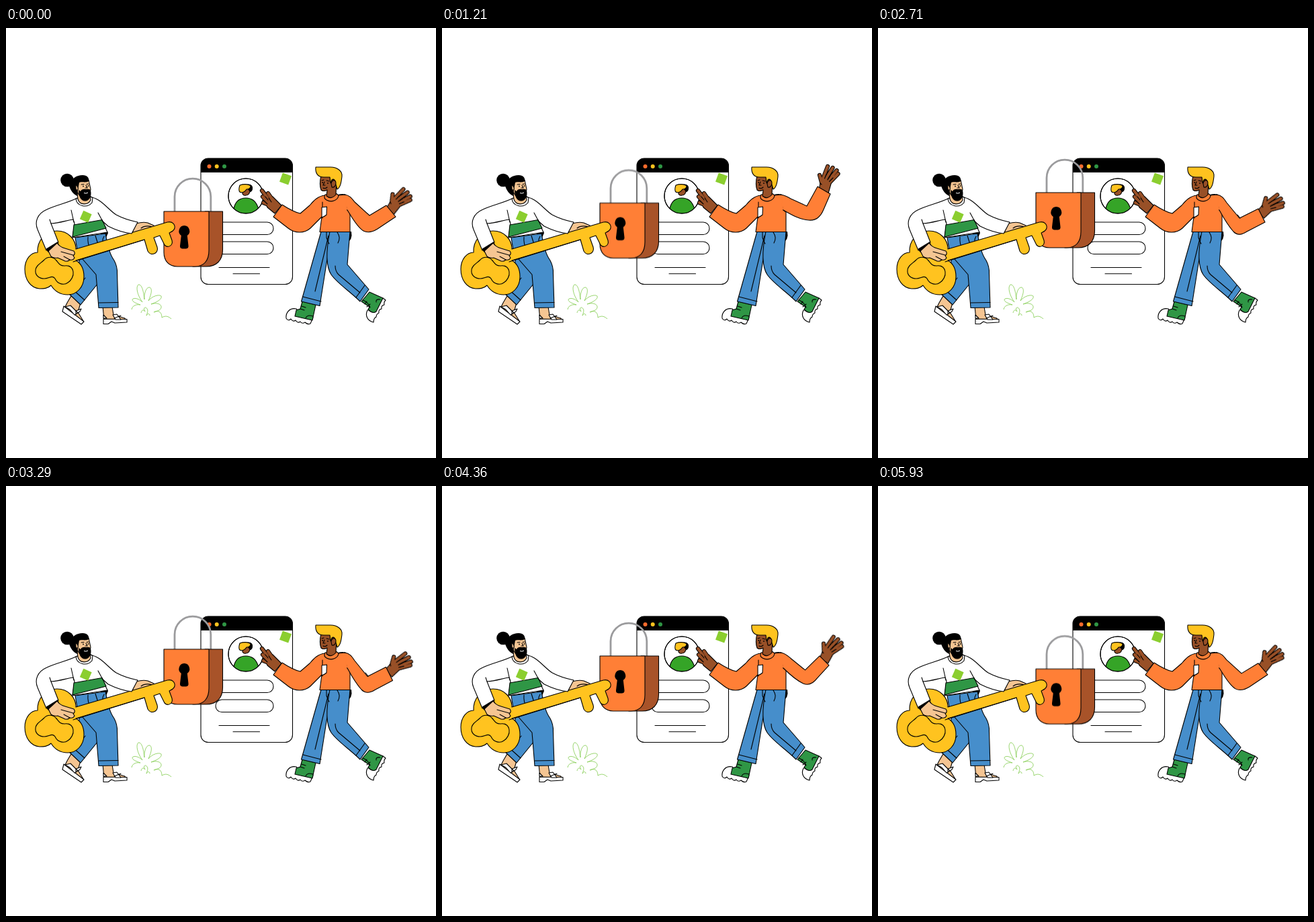
These frames come from a looping animation (640x640 px, 6000 ms). An HTML page:

```html
<!DOCTYPE html>
<html lang="en">
<head>
<meta charset="utf-8">
<title>Unlocking a profile</title>
<style>
html, body { margin: 0; width: 100%; height: 100%; overflow: hidden; background: #fff; }
svg { display: block; width: 100vw; height: 100vh; }

.ink { stroke: #000; stroke-width: 1.1; stroke-linejoin: round; stroke-linecap: round; }
.none { fill: none; }
.white { fill: #fff; }
.black { fill: #000; }
.orange { fill: #ff7f36; }
.rust { fill: #a85329; }
.yellow { fill: #ffc31f; }
.blue { fill: #468ecb; }
.green { fill: #2f9645; }
.lime { fill: #8bce2f; }
.skin { fill: #f5c592; }
.brown { fill: #985027; }
.finger-edge { fill: none; stroke: #000; stroke-width: 6.2; stroke-linecap: round; }
.finger { fill: none; stroke: #985027; stroke-width: 4.2; stroke-linecap: round; }

#lock { animation: lift 6s infinite; }
#arm { animation: arm 6s ease-in-out infinite; }
#hand { animation: hand 6s ease-in-out infinite; }
#crease { animation: crease 6s step-end infinite; }

@keyframes lift {
  0% { transform: translateY(0); animation-timing-function: linear; }
  50% { transform: translateY(-31px); animation-timing-function: cubic-bezier(.25, 0, .75, .75); }
  100% { transform: translateY(0); }
}
@keyframes arm {
  0%, 100% { d: path("M504 248 C512 249 515 254 519 259 L541 279 L566 264 L580 281 L553 299 C545 304 538 305 532 302 C522 296 514 280 508 271"); }
  20%, 31% { d: path("M504 248 C510 249 514 251 519 254 L543 265 L559 236 L578 247 L568 270 C564 280 557 287 546 286 C532 285 520 278 508 271"); }
  25.5%, 81% { d: path("M504 248 C510 249 514 251 519 253 L543 264 L559 236 L577 244 L568 268 C564 279 557 286 546 285 C532 284 520 278 508 271"); }
  45% { d: path("M504 248 C512 249 515 254 519 260 L538 283 L566 269 L576 289 L549 303 C541 308 535 309 529 303 C520 293 514 282 508 271"); }
  64.3% { d: path("M504 248 C512 249 515 254 519 260 L538 284 L565 270 L575 290 L549 304 C541 309 535 309 529 303 C520 293 514 282 508 271"); }
}
@keyframes hand {
  0%, 100% { transform: translate(572px, 272px) rotate(22deg); }
  20%, 31% { transform: translate(568px, 243px) rotate(0deg); }
  25.5%, 81% { transform: translate(567px, 240px) rotate(-5deg); }
  45% { transform: translate(570px, 277px) rotate(31deg); }
  64.3% { transform: translate(570px, 279px) rotate(31deg); }
}
@keyframes crease {
  0%, 100% { opacity: 0; }
  43% { opacity: 1; }
  66% { opacity: 0; }
}
</style>
</head>
<body>
<svg viewBox="0 0 640 640">
  <defs>
    <clipPath id="disc"><circle cx="357" cy="250" r="26"/></clipPath>
    <clipPath id="pane"><rect x="290" y="194" width="136.5" height="187.5" rx="11"/></clipPath>
    <path id="fingers" d="M-1 -19L6 -37M3 -18L13.500 -35M7 -16L19.500 -31M8 -12L21.500 -26M-3 -13L-6 -24"/>
    <path id="resting" d="M394 259L381 242M390 260L382 251M391 263L383 260M399 259L390 246"/>
  </defs>

  <!-- Profile window -->
  <rect class="white" x="290" y="194" width="136.5" height="187.5" rx="11"/>
  <rect x="290" y="194" width="137" height="21" clip-path="url(#pane)"/>
  <rect class="ink none" x="290" y="194" width="136.5" height="187.5" rx="11"/>
  <circle fill="#ff6c2c" cx="302.5" cy="206" r="3"/>
  <circle class="yellow" cx="313.7" cy="206" r="3"/>
  <circle class="green" cx="325" cy="206" r="3"/>
  <rect class="lime" x="409" y="217.5" width="14" height="14" transform="rotate(20 416 224.5)"/>
  <circle class="ink white" cx="357" cy="250" r="26"/>
  <g clip-path="url(#disc)">
    <path class="ink" fill="#35a427" d="M338 276C339 260 346 253 357 253S375 260 377 276Z"/>
  </g>
  <path class="black" d="M358 233C364 231 368 235 367 239C367 243 364 245 361 244Z"/>
  <path class="ink brown" d="M352 241L352 247Q354 250 357 249Q362 249 363 243L360 239Z"/>
  <path class="ink yellow" d="M348 234C353 232 361 232 364 235C364 239 361 240 358 240C356 244 351 246 348 244C346 242 347 237 348 234Z"/>
  <circle class="ink none" cx="357" cy="250" r="26"/>
  <rect class="ink white" x="312" y="289" width="86" height="18.5" rx="9.2"/>
  <rect class="ink white" x="312" y="318" width="86" height="18.5" rx="9.2"/>
  <path class="ink none" d="M317 356.5H392M338 365.800H377.5"/>

  <!-- Padlock -->
  <g id="lock">
    <path fill="none" stroke="#9b9b9d" stroke-width="2.8" d="M251 273V251A26.9 26.9 0 0 1 304.8 251V273"/>
    <path class="ink rust" d="M296 273H322.5V330C322.5 346 313 355 298 355H278Z"/>
    <path class="ink orange" d="M235 273H302V331C302 347 294 355 281 355H255C243 355 235 347 235 334Z"/>
    <path class="black" d="M265.3 294A8.3 8.3 0 0 1 269.8 309L271.5 324Q272 328 268 328.5H262.5Q258.5 328 259 324L260.8 309A8.3 8.3 0 0 1 265.3 294Z"/>
  </g>

  <!-- Waving man -->
  <g>
    <!-- boots -->
    <path class="ink white" d="M432 418C422 416 416 424 417 432Q420 437 424 433Q427 438 431 435Q434 440 438 437Q441 441 445 438Q449 442 453 440L457 431L438 424Z"/>
    <path class="ink green" d="M441 407L461 412L456 435L430 429L432 420L438 418Z"/>
    <path class="ink none" d="M438 418L444 420M440 414L446 416M446 432Q448 426 457 429"/>
    <path class="ink white" d="M561 402L565 405Q562 408 563 412Q558 413 559 418Q554 419 555 424Q551 426 551 430Q547 432 547 438C538 436 534 428 538 420L549 418Z"/>
    <path class="ink green" d="M541 393L561 402L551 422Q546 426 539 419L541 415L529 407Z"/>
    <path class="ink none" d="M531 405Q539 408 542 416M537 407L534 411M542 411L537 415M551 408Q550 403 557 404"/>
    <!-- jeans -->
    <path class="black" d="M509 303H514L514.5 309Q514 314 511 317L507 312Z"/>
    <path class="ink blue" d="M469 303L439.500 407L467 413.500L481 325L496 304Z"/>
    <path class="ink blue" d="M482 303C477 328 475 353 484 367C493 380 512 392 527 407L540 389L508 352L512 303Z"/>
    <path class="ink none" d="M442 400L469 407M521 401L534 383M480 309L460 392M477 304V312Q480 320 481 321M493 304C497 310 497 314 494 320M490 354Q490 362 495 367L527 394"/>
    <!-- resting hand -->
    <use href="#resting" class="finger-edge"/>
    <path class="ink brown" d="M397 251L410 264L400 276L389 267L385 258L390 256Z"/>
    <use href="#resting" class="finger"/>
    <path class="ink none" d="M390 256L386 251M389 262L384 257M395 259L391 253"/>
    <!-- raised hand -->
    <g id="hand">
      <use href="#fingers" class="finger-edge"/>
      <path class="ink brown" d="M-7 -1L-5 -13L-1 -20L9 -17L11 -11L7 3Z"/>
      <use href="#fingers" class="finger"/>
      <path class="ink none" d="M1.500 -19L4 -25M6 -17L10 -23M8.500 -14.500L14 -20M-5 -12L-3 -10"/>
    </g>
    <!-- jumper -->
    <path class="ink orange" d="M475 249C464 250 458 257 452 264L438 276Q428 274 411 263L398 281L420 298C430 306 444 306 453 298L470 281L467 303.5H512L512 274L508 271L505 248L495 249Z"/>
    <path id="arm" class="ink orange" d="M504 248C512 249 515 254 519 259L541 279L566 264L580 281L553 299C545 304 538 305 532 302C522 296 514 280 508 271"/>
    <path fill="none" stroke="#ff7f36" stroke-width="2" d="M505 250L507 270"/>
    <path class="ink none" d="M493 249Q499 247 505 248M471 259V283"/>
    <path class="ink none" id="crease" d="M535 278L539 283"/>
    <path class="ink white" d="M470 267L477.5 266L477 278Q475 280 470 282Z"/>
    <!-- head -->
    <path class="ink orange" d="M475 248Q472 253 477 256C484 260 494 257 495 249L491 246Z"/>
    <path class="ink brown" d="M469 219C467 228 467 236 469 241Q472 244 478 241L477 250Q484 256 491 248L492 224Z"/>
    <path class="ink yellow" d="M461 207H483C493 207 501 213 500 221C499 229 498 237 493 240L490 230Q489 223 485 226L483 231L482 222H473C464 222 460 216 461 207Z"/>
    <path class="ink brown" d="M484 232C485 225 491 225 491 231Q490 238 485 237Z"/>
    <path class="ink none" d="M470 227L473 226M477 227L481 228M474 229L472 234H475M472 238Q475 240 478 237"/>
    <circle cx="471" cy="230" r=".9"/><circle cx="479" cy="231" r=".9"/>
  </g>

  <!-- Bush -->
  <g fill="none" stroke="#7fcb4b" stroke-width=".8">
    <path d="M187 419C188 413 194 411 200 412C191 409 186 406 189 403C194 401 200 405 203 408C195 397 193 385 197 382C203 381 205 395 206 404C205 395 209 385 214 386C219 389 215 399 212 406C217 399 228 396 231 399C233 404 222 409 216 411C224 408 232 411 231 416C230 421 224 421 220 423C228 419 232 424 232 431C238 427 243 430 246 433"/>
    <path d="M201 424C202 419 205 419 207 422C203 416 208 414 210 418C212 420 210 425 209 428C211 424 214 425 214 428"/>
  </g>

  <!-- Man with the key -->
  <g>
    <!-- sandals -->
    <path class="ink skin" d="M98 397L111 409L107 423L115 436L108 437L86 419L91 409Z"/>
    <path class="ink white" d="M86 414L116 437L112 441L84 422Z"/>
    <path class="ink white" d="M88 415L96 413L107 424L102 427L95 419ZM104 421L112 418L110 422L104 426Z"/>
    <path class="ink skin" d="M144 414L158 415L160 427L177 432L178 435H146Z"/>
    <path class="ink white" d="M145 433L180 433.5V438L162 439L157 437L152 440.5H145Z"/>
    <path class="ink white" d="M145 427L150 432H145ZM159 427L165 426L171 434H163Z"/>
    <path class="ink none" d="M161 432L171 428"/>
    <!-- jeans -->
    <path class="ink blue" d="M110 338L136 360L137 380L111 412L92 394L106 372Z"/>
    <path class="ink none" d="M97 387L117 405M118 372L102 391"/>
    <path class="black" d="M143 291L152 305L149 312L141 309Z"/>
    <path class="ink blue" d="M103 312L148 306C151 320 153 335 161 346Q166 355 165.5 366L167 416L138 416.5L134 367L107 336Z"/>
    <path class="ink none" d="M138 409L167 408.5M122 311Q121 322 126 328M133 309L138 325M146 310Q141 318 148 323"/>
    <!-- far hand -->
    <path class="ink skin" d="M188 304L194 291Q204 288 211 290L220 294Q223 298 214 301L195 307Z"/>
    <path class="ink none" d="M201 298Q207 293 218 296M205 301L214 298"/>
    <!-- key -->
    <path class="ink yellow" d="M47 334C46 317 58 302 76 302C93 302 104 315 104 329L240 289C248 287 252 293 251 298C250 302 247 303 243 305L247 316C249 324 241 328 236 323L229 309L220 312L225 326C228 335 216 341 211 332L206 315L104 346C111 350 116 358 116 370C116 386 105 397 92 397C80 397 72 391 67 383C62 388 56 388 50 388C37 387 28 375 28 359C28 344 37 334 47 334Z"/>
    <path class="ink none" d="M57 345C51 351 45 353 44 360C43 368 49 373 57 373C64 373 69 367 73 373C77 382 87 383 92 379C97 376 101 369 100 363C99 356 94 353 87 354C79 354 78 349 74 345C70 340 61 340 57 345ZM100 348L206 315"/>
    <!-- sweater -->
    <path class="ink white" d="M106 253C93 260 76 263 61 270C47 276 42 288 47 300L60 331L78 319L67 291C81 290 91 286 100 285L102 291L99 312L151 304L143 287L152 295Q170 304 187 306L196 289Q177 285 164 278C154 272 142 255 128 252Z"/>
    <path class="black" d="M59 329L77 318L79 323L63 334Z"/>
    <path class="ink green" d="M101 293L143 285.5L149 298L99 311Z"/>
    <path class="ink none" d="M97 271L101 289M137 275L144 288M67 291L65 285"/>
    <rect class="lime" x="112" y="274" width="13.5" height="13.5" transform="rotate(24 118.7 280.7)"/>
    <!-- near hand -->
    <path class="ink skin" d="M63 332L76 320Q80 326 88 328L101 332Q104 336 100 339L102 342Q100 346 95 345Q91 349 86 346L77 342Q70 343 67 340Z"/>
    <path class="ink none" d="M82 333L100 338M95 345L86 340"/>
    <!-- head -->
    <path class="ink white" d="M104 254C105 265 120 269 128 260L129 253L125 250Z"/>
    <path class="ink skin" d="M106 246L107 255C110 264 122 264 126 256L125 246Z"/>
    <path class="ink skin" d="M105 229L123 226L126 240L124 250L109 249L104 240Z"/>
    <circle cx="91" cy="226.5" r="9.8"/>
    <path class="black" d="M95 234C97 224 105 219 114 219C121 219 124 223 123 228C119 231 112 228 109 230L107 241L106 250C101 248 96 242 94 235Z"/>
    <path class="black" d="M108 241L111 243Q113 239 119 240Q125 239 126 242C128 250 124 257.5 118 257.5C111 257.5 108 250 108 241Z"/>
    <path class="ink skin" d="M104 236Q102 233 104 234Q108 236 107 241Q103 242 104 236Z"/>
    <path class="ink none" d="M112 233L116 232.5M120 232.5L123 232M119 234L121 238H118"/>
    <circle cx="115" cy="235.5" r=".9"/><circle cx="122.5" cy="235" r=".9"/>
    <path fill="none" stroke="#fff" d="M116 245.5Q119 247 122 245"/>
  </g>
</svg>
</body>
</html>
```
